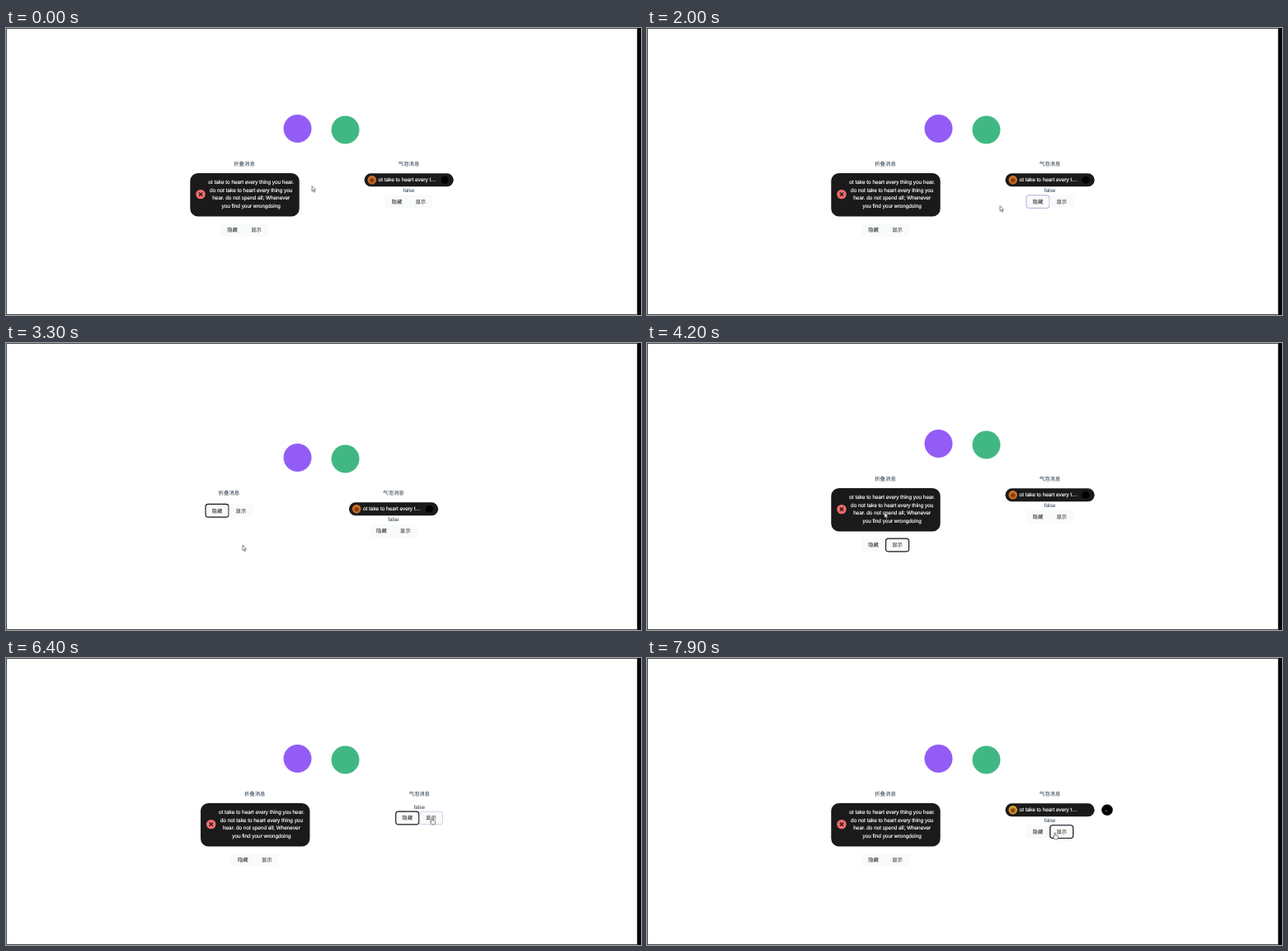
Recreate the animation shown at these times as an HTML page. Size 770 by 348 pixels, loop 8 s.

```html
<!DOCTYPE html>
<html lang="zh">
<head>
<meta charset="utf-8">
<title>消息</title>
<style>
  html, body { margin: 0; width: 100%; height: 100%; overflow: hidden; background: #fff; }
  svg { display: block; }
  text {
    font: 6.4px "Liberation Sans", Arial, "Noto Sans CJK SC", "Noto Sans CJK", sans-serif;
    text-anchor: middle; text-rendering: geometricPrecision; fill: #213547;
  }
  .light text { fill: #fff; stroke: #fff; stroke-width: .15; }
  .button text { fill: #1c1c1c; }
  .face { fill: #f9fbfb; }
  .hover, .focus { fill: none; rx: 3.2px; }
  .hover { stroke: #aba4dc; stroke-width: .9; }
  .focus { stroke: #161616; stroke-width: 1.15; }
</style>
</head>
<body>
<svg width="770" height="348" viewBox="0 0 770 348">
  <defs>
    <radialGradient id="photo" cy=".55">
      <stop offset=".1" stop-color="#6b3012"/>
      <stop id="tone" offset=".9" stop-color="#e07a26"/>
    </radialGradient>
  </defs>
  <rect x=".5" y=".5" width="765" height="347" fill="#fff" stroke="#484848"/>
  <rect x="766" width="4" height="348" fill="#060606"/>

  <g id="logos">
    <circle cx="353.5" cy="122" r="17" fill="#945cf6"/>
    <circle cx="411.5" cy="123.5" r="17" fill="#41b883"/>
  </g>

  <g id="left">
    <text x="289" y="166.8">折叠消息</text>
    <g id="card" class="light">
      <rect x="223.3" y="176" width="132.4" height="52.6" rx="9.6" fill="#1a1a1a"/>
      <circle cx="236" cy="201.6" r="5.7" fill="#f56c6c"/>
      <path d="M233.9 199.5l4.2 4.2m0-4.2l-4.2 4.2" stroke="#1a1a1a" stroke-width="1.3"/>
      <text x="297.2" y="189.2">ot take to heart every thing you hear.</text>
      <text x="297.2" y="198.8">do not take to heart every thing you</text>
      <text x="297.2" y="208.4">hear. do not spend all; Whenever</text>
      <text x="297.2" y="218">you find your wrongdoing</text>
    </g>
    <g id="leftControls"></g>
  </g>

  <g id="right">
    <text x="488.5" y="166.8">气泡消息</text>
    <g id="pill" class="light">
      <circle id="ball" cy="184.3"/>
      <rect x="434.5" y="176.3" width="108.2" height="16" rx="8" fill="#1a1a1a"/>
      <circle id="disc" cx="532" cy="184.3" r="4.5"/>
      <circle cx="443.7" cy="184.3" r="5.2" fill="url(#photo)"/>
      <text x="486.6" y="186.3">ot take to heart every t…</text>
      <circle id="speck" r=".6" fill="#ddd"/>
    </g>
    <g id="rightControls"><text x="488.5" y="199.2">false</text></g>
  </g>

  <g id="cursor" stroke="#333" stroke-width=".6" stroke-linejoin="round" fill="#fff">
    <path id="arrow" d="M0 0V6.6L1.5 5.2L2.5 7.6L3.5 7.2L2.5 4.9H4.5Z"/>
    <path id="hand" d="M-.6 .6Q0-.3 .6 .6V3.2L3.6 4Q4.2 4.2 4.1 5L3.6 8.3H-.2L-2.3 5.4Q-2.2 4.4-1.4 4.7L-.6 5.4Z"/>
  </g>
</svg>
<script>
const LOOP = 8000, STEP = 100, FOLD = 400, FADE = 250;
const $ = id => document.getElementById(id);
const clamp = v => Math.max(0, Math.min(1, v));
const move = (id, x, y) => $(id).setAttribute("transform", `translate(${x} ${y})`);
const show = (node, on) => node.setAttribute("opacity", +on);

// Pointer stops: time, x, y
const path = [
  [0, 371, 191.5], [450, 421, 133], [900, 476, 211], [1300, 474, 211], [1900, 474, 211],
  [2000, 428, 215.5], [2500, 276, 243], [2900, 276, 244], [3300, 287, 245], [3600, 287, 204],
  [4200, 288, 205.5], [4650, 475, 211], [4800, 477.5, 211.5], [5900, 477.5, 211.5],
  [6300, 516.5, 193.5], [6900, 516.5, 193.5], [7200, 508, 217], [7400, 494.5, 211.5], [LOOP, 494.5, 211.5]
];

const buttons = [
  { parent: "leftControls", x: 274.6, y: 245, label: "隐藏", hovers: [[2500, 3000]], focus: [2600, 3700] },
  { parent: "leftControls", x: 303.6, y: 245, label: "显示", hovers: [[3600, 3800]], focus: [3700, 5200] },
  { parent: "rightControls", x: 474, y: 210.6, label: "隐藏", hovers: [[900, 2000], [4600, 5700]], focus: [5200, 6500] },
  { parent: "rightControls", x: 502.8, y: 210.6, label: "显示", hovers: [[6250, 6600], [7200, LOOP]], focus: [6500, LOOP] }
];

for (const b of buttons) {
  const box = (cls, w, h) =>
    `<rect class="${cls}" x="${b.x - w / 2}" y="${b.y - h / 2}" width="${w}" height="${h}"/>`;
  $(b.parent).insertAdjacentHTML("beforeend",
    `<g class="button">${box("face", 28.8, 16)}${box("hover", 28, 15.6)}${box("focus", 28, 15.8)}
     <text x="${b.x}" y="${b.y + 2.4}">${b.label}</text></g>`);
  b.node = $(b.parent).lastElementChild;
}

function pointer(t) {
  const i = path.findIndex(p => p[0] > t);
  const [t0, x0, y0] = path[i - 1], [t1, x1, y1] = path[i];
  const k = (t - t0) / (t1 - t0);
  return [x0 + (x1 - x0) * k, y0 + (y1 - y0) * k];
}

// Squashes a message about its middle; returns true once it leaves the layout
function fold(id, cy, t, hideAt, showAt) {
  const scale = t < showAt ? clamp(1 - (t - hideAt) / FOLD) : clamp((t - showAt) / FOLD);
  $(id).setAttribute("transform", `translate(0 ${cy * (1 - scale)}) scale(1 ${scale})`);
  return t >= hideAt + FOLD && t < showAt;
}

function draw(t) {
  const cardGone = fold("card", 202.3, t, 2600, 3800);
  const pillGone = fold("pill", 184.3, t, 5200, 6500);
  const dx = cardGone ? -18.6 : pillGone ? 12.7 : 0;
  const dy = cardGone ? 17 : 0;
  move("logos", 0, dy);
  move("left", dx, dy);
  move("right", dx, dy);
  move("leftControls", 0, cardGone ? -58.8 : 0);
  move("rightControls", 0, pillGone ? -16.6 : 0);

  let over = false;
  for (const { node, hovers, focus: [from, to] } of buttons) {
    const glow = hovers.map(([a, b]) => Math.min(clamp((t - a) / FADE), clamp(1 - (t - b) / FADE)));
    over ||= hovers.some(([a, b]) => t >= a && t < b);
    show(node.querySelector(".focus"), t >= from && t < to);
    show(node.querySelector(".hover"), Math.max(...glow));
  }

  const out = clamp((t - 6900) / 500);
  $("ball").setAttribute("cx", 532 + 26 * out);
  $("ball").setAttribute("r", 4.5 + 2.3 * out);
  show($("disc"), out === 0);
  const turn = t / 150;
  move("speck", 558 + 1.6 * Math.cos(turn), 184.3 + 1.6 * Math.sin(turn));
  show($("speck"), t >= 7400);
  $("tone").setAttribute("stop-color", t < 7600 ? "#e07a26" : "#e8aa30");

  move("cursor", ...pointer(t));
  show($("arrow"), !over);
  show($("hand"), over);
}

function tick() {
  draw(Math.floor(performance.now() % LOOP / STEP) * STEP);
  requestAnimationFrame(tick);
}
tick();
</script>
</body>
</html>
```
